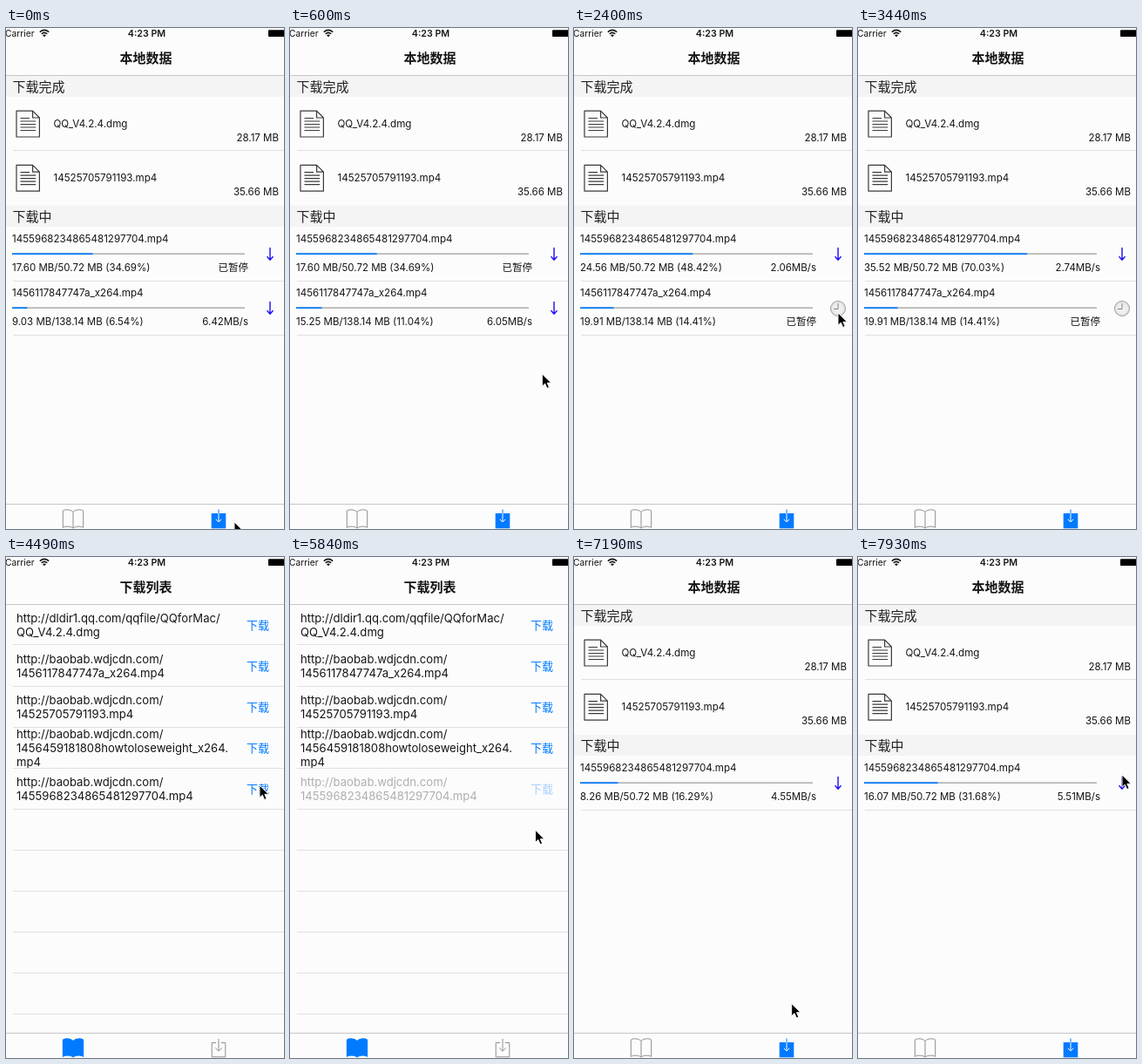
Recreate the animation shown at these times as an HTML page. Size 319 by 575 pixels, loop 8 s.

```html
<!DOCTYPE html>
<html lang="zh-CN">
<head>
<meta charset="utf-8">
<title>下载列表</title>
<style>
  html, body { margin: 0; width: 100%; height: 100%; overflow: hidden; background: #fcfcfc; }
  svg { display: block; width: 100%; height: 100%; }
  text { font: 11.5px Inter, "Noto Sans CJK SC", "Noto Sans CJK", sans-serif; fill: #151515; white-space: pre; }
  .cjk { font-family: "Noto Sans CJK SC", "Noto Sans CJK", sans-serif; }
  .title { font-size: 15px; font-weight: 700; }
  .section { font-size: 15px; font-weight: 500; fill: #222; }
  .name { font-size: 11.6px; }
  .url { font-size: 13.1px; }
  .button { font-size: 13px; fill: #007aff; }
  .carrier { font-size: 10.3px; }
  .clock { font-size: 10.7px; font-weight: 600; }
  .end { text-anchor: end; }
  .mid { text-anchor: middle; }
  .rule { stroke: #e0e0e2; }
  .bar { stroke: #c6c6c6; }
</style>
</head>
<body>
<svg id="stage" viewBox="0 0 319 575" xmlns="http://www.w3.org/2000/svg">
  <defs>
    <radialGradient id="dial">
      <stop offset="0" stop-color="#f4f4f4"/>
      <stop offset=".75" stop-color="#ebebeb"/>
      <stop offset="1" stop-color="#cacaca"/>
    </radialGradient>
    <g id="file" fill="none" stroke="#3a3a3a" stroke-width="1.2">
      <path d="M12 .7H30.6L38.4 8.5V30.5H12ZM30.6 .7V8.5H38.4" stroke-linejoin="round"/>
      <path d="M16.5 9H27M16.5 12.5H34.2M16.5 16H34.2M16.5 19.5H34.2M16.5 23H34.2"/>
    </g>
  </defs>

  <g id="local"></g>
  <g id="list"></g>

  <text class="carrier" x="-1" y="10">Carrier</text>
  <g fill="none" stroke="#111" stroke-width="1.5">
    <path d="M38.8 4.6Q44 .2 49.2 4.6M40.7 6.8Q44 4 47.3 6.8"/>
    <path d="M44 10.2L42 8.2Q44 6.7 46 8.2Z" fill="#111" stroke="none"/>
  </g>
  <text class="clock mid" x="161.5" y="10">4:23 PM</text>
  <rect x="301" y="2.3" width="20" height="7.6" rx="1" fill="#000"/>
  <text id="title" class="title cjk mid" x="160.5" y="40"></text>
  <path class="bar" d="M0 54.5H319M0 546.5H319"/>

  <path id="book" stroke-linejoin="round" d="M77 555.5C74 552.3 68 552.3 65.3 554V573.4C68 571.6 74 571.6 77 574C80 571.6 86 571.6 88.7 573.4V554C86 552.3 80 552.3 77 555.5V574"/>
  <g id="tray" fill="none">
    <g id="trayOff" stroke="#8e8e93">
      <path d="M241 557.5H236.2V573.8H251.8V557.5H247"/>
      <path d="M244 553V567M240.3 563.5L244 567.2L247.7 563.5"/>
    </g>
    <g id="trayOn">
      <path d="M235.7 557H252.3V574.3H235.7Z" fill="#007aff"/>
      <path d="M244 552.5V557" stroke="#007aff"/>
      <path d="M244 557V567M240.8 563.8L244 567L247.2 563.8" stroke="#fff"/>
    </g>
  </g>
  <path id="cursor" d="M0 0V14.2L3.3 11.2L5.6 16.5L8.1 15.4L5.8 10.3H10.3Z" fill="#000" stroke="#fff" stroke-width=".9"/>
</svg>

<script>
const LOOP = 8000;
const BLUE = '#007aff', GREY = '#8e8e93';
const $ = id => document.getElementById(id);
const set = (el, attrs) => { for (const k in attrs) el.setAttribute(k, attrs[k]); };
const show = (el, on) => el.setAttribute('display', on ? 'inline' : 'none');

function add(parent, tag, attrs, text) {
  const el = document.createElementNS('http://www.w3.org/2000/svg', tag);
  set(el, attrs);
  if (text) el.textContent = text;
  parent.appendChild(el);
  return el;
}
const label = (parent, x, y, text, cls = '') => add(parent, 'text', { x, y, class: cls }, text);
const rule = (parent, y) => add(parent, 'path', { class: 'rule', d: `M8 ${y}H319` });

// Local data screen
const local = $('local');

function section(y, name) {
  add(local, 'rect', { x: 0, y, width: 319, height: 24, fill: '#f4f4f4' });
  label(local, 7.5, y + 17.7, name, 'section cjk');
}

function fileRow(y, name, size) {
  add(local, 'use', { href: '#file', y: y + 15 });
  label(local, 54.5, y + 34.3, name, 'name');
  label(local, 313, y + 50.5, size, 'end');
}

function taskRow(y, name, total) {
  const g = add(local, 'g', {});
  label(g, 7, y + 18.3, name, 'name');
  add(g, 'rect', { x: 7, y: y + 30.4, width: 267, height: 1.7, fill: '#b3b3b3' });
  const fill = add(g, 'rect', { x: 7, y: y + 30.4, height: 1.7, fill: BLUE });
  const info = label(g, 7, y + 51.3, '');
  const state = label(g, 278, y + 51.3, '', 'end');
  rule(g, y + 62.5);
  const arrow = add(g, 'path', {
    d: `M303 ${y + 24}V${y + 38}M299.5 ${y + 34.3}L303 ${y + 38.2}L306.5 ${y + 34.3}`,
    fill: 'none', stroke: '#1e0cf5', 'stroke-width': 1.4
  });
  const clock = add(g, 'g', {});
  add(clock, 'circle', { cx: 303, cy: y + 32, r: 8.6, fill: 'url(#dial)', stroke: '#a8a8a8' });
  add(clock, 'path', { d: `M303 ${y + 26}V${y + 32.5}H298`, fill: 'none', stroke: '#808080' });

  return (mb, speed, waiting) => {
    const part = mb / total;
    set(fill, { width: 267 * part });
    info.textContent = `${mb.toFixed(2)} MB/${total.toFixed(2)} MB (${(part * 100).toFixed(2)}%)`;
    state.textContent = speed ? speed.toFixed(2) + 'MB/s' : '已暂停';
    show(arrow, !waiting);
    show(clock, waiting);
    return g;
  };
}

section(55, '下载完成');
fileRow(79.5, 'QQ_V4.2.4.dmg', '28.17 MB');
rule(local, 140.5);
fileRow(141.7, '14525705791193.mp4', '35.66 MB');
section(204, '下载中');
const first = taskRow(228, '1455968234865481297704.mp4', 50.72);
const second = taskRow(290, '1456117847747a_x264.mp4', 138.14);

// Address list screen
const list = $('list');
const rows = [
  ['http://dldir1.qq.com/qqfile/QQforMac/', 'QQ_V4.2.4.dmg'],
  ['http://baobab.wdjcdn.com/', '1456117847747a_x264.mp4'],
  ['http://baobab.wdjcdn.com/', '14525705791193.mp4'],
  ['http://baobab.wdjcdn.com/', '1456459181808howtoloseweight_x264.', 'mp4'],
  ['http://baobab.wdjcdn.com/', '1455968234865481297704.mp4']
].map((lines, i) => {
  const g = add(list, 'g', {}), mid = 78 + 47.1 * i;
  lines.forEach((s, k) => label(g, 12, mid + 4.7 + 16 * (k - (lines.length - 1) / 2), s, 'url'));
  label(g, 276, mid + 4.8, '下载', 'button cjk');
  return g;
});
for (let i = 0; i < 10; i++) rule(list, Math.floor(100.9 + 47.1 * i) + .5);

// Motion: [time, value, ...]
const pointer = [
  [0, 262, 567], [900, 303, 312], [1050, 303, 311], [1200, 313, 283], [1350, 306, 265],
  [1500, 302, 259], [1800, 302, 259], [2400, 303, 327], [2550, 303, 327], [2700, 315, 327],
  [2850, 332, 327], [3599, 332, 327], [3600, 283, 256], [3750, 283, 256], [4500, 291, 262],
  [5100, 291, 262], [5250, 290, 263], [5700, 290, 263], [6600, 239, 565], [7050, 239, 565],
  [7950, 303, 250]
];
const firstMb = [[0, 17.596], [1740, 17.596], [2400, 24.56], [3450, 35.52], [3600, 37.1], [7049, 37.1], [7050, 6.7], [7950, 16.07]];
const firstSpeed = [[1800, 3.12], [2400, 2.06], [3450, 2.74], [7050, 4.36], [7950, 5.51]];
const secondMb = [[0, 9.03], [1050, 19.91]];
const secondSpeed = [[0, 6.42], [900, 5.87]];

function at(keys, t) {
  let i = 0;
  while (i < keys.length - 2 && t >= keys[i + 1][0]) i++;
  const a = keys[i], b = keys[i + 1];
  const u = Math.min(1, Math.max(0, (t - a[0]) / (b[0] - a[0])));
  return a.slice(1).map((v, k) => v + (b[k + 1] - v) * u);
}

// The picture advances on a 150 ms beat that drifts slightly.
function beat(t) {
  const drift = t < 3100 ? 0 : t < 7800 ? 10 : 20;
  return Math.floor((t + drift) / 150) * 150;
}

function draw(time) {
  const t = beat(time % LOOP);
  const onList = t >= 3600 && t < 7050;
  show(local, !onList);
  show(list, onList);
  $('title').textContent = onList ? '下载列表' : '本地数据';
  set($('book'), { fill: onList ? BLUE : 'none', stroke: onList ? BLUE : GREY });
  show($('trayOff'), onList);
  show($('trayOn'), !onList);

  first(at(firstMb, t)[0], t < 1800 ? 0 : at(firstSpeed, t)[0], false);
  const paused = t >= 1050;
  show(second(at(secondMb, t)[0], paused ? 0 : at(secondSpeed, t)[0], paused), t < 3600);
  set(rows[4], { opacity: at([[5550, 1], [6000, 0]], t)[0] });

  const [x, y] = at(pointer, t);
  set($('cursor'), { transform: `translate(${x} ${y})` });
}

function loop(now) {
  draw(now);
  requestAnimationFrame(loop);
}
draw(0);
requestAnimationFrame(loop);
</script>
</body>
</html>
```
